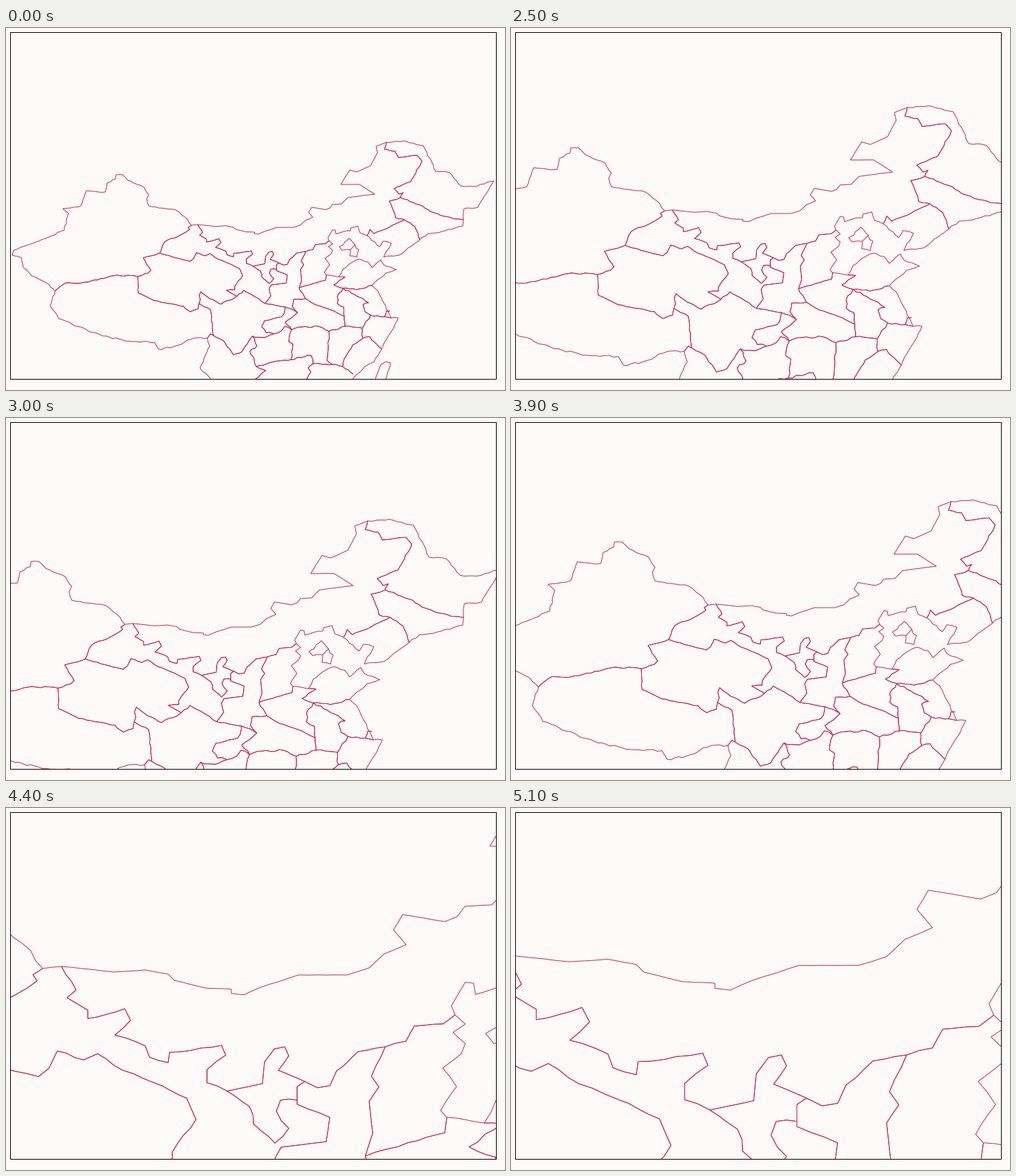
Write a matplotlib script that moves like this. It is 720 px wide and 523 px high and loops after 7.1 s.

```python
import numpy as np
import matplotlib.pyplot as plt
from matplotlib.animation import FuncAnimation
from matplotlib.collections import LineCollection
from matplotlib.patches import Rectangle

W, H, DPI = 720, 523, 100
PX = 72 / DPI
STEP = 100            # ms per frame
LOOP = 7100
PAPER, INK = "#fefafa", "#c72b54"
NOTCH = 1.2454        # zoom factor of one wheel step

rng = np.random.default_rng(8)
borders = []


def roughen(pts, rough):
    """Split long legs into short ones and push the new points sideways."""
    out = [pts[0]]
    for a, b in zip(pts, pts[1:]):
        leg = b - a
        n = max(1, round(np.hypot(*leg) / 5))
        side = np.array([-leg[1], leg[0]]) / np.hypot(*leg)
        for t in np.arange(1, n) / n:
            out.append(a + leg * t + side * rng.uniform(-rough, rough))
        out.append(b)
    return np.array(out)


def edge(*pts, rough=0.9):
    borders.append(roughen(np.array(pts, float), rough))


def shared(*pts, rough=0.9):
    """A border between two regions is stroked once for each of them."""
    edge(*pts, rough=rough)
    borders.append(borders[-1])


# Points where three borders meet, at scale 1
gate, steppe = (267.7, 285), (276.7, 284)
foot, pass_w, pass_n = (71, 380), (190, 359), (222, 325)
north, elbow, fork = (549, 165), (569, 245), (575, 277)
river, gulf, bay = (660, 277), (597, 306), (521, 300)
wall, bend, sand, dune = (466.3, 307.4), (432.6, 322.8), (393.9, 339.5), (356.5, 344.1)
well, knee, ridge, spur = (390.2, 348.5), (423, 375.5), (462.3, 356.8), (480.3, 359.5)
plain, cape, gorge, ford = (486, 376), (528, 372), (432, 391), (488, 416.5)
lake, moor, hill, delta = (489, 431), (466, 438), (514, 433.5), (526, 415)
port, dale, cove = (555.5, 419), (515, 448), (542, 464)
peak, glen, cliff = (333, 387.5), (278.5, 398), (374, 398)
brook, mill, cave = (403, 403), (420.5, 411), (412, 436)
snow, rim, wood, vale = (299, 444), (290.5, 448), (355.5, 445), (386, 442)
palm, fern, tea, rice, pine = (411, 479), (361, 489), (443, 485), (471, 486), (486, 489)

# Outer edges
edge(gate, (258, 273), (245, 263), (206, 257), (203, 247), (206, 241), (199, 230),
     (176, 220), (168, 212), (159, 212), (158, 218), (146, 224), (143, 237),
     (116, 235), (108, 257), (82, 261), (90, 268), (84, 292), (57, 304), (11, 321),
     (9, 328), (22, 332), (25, 346), (37, 358), (58, 368), foot)
edge(foot, (64, 402), (76, 420), (140, 445), (182, 453), (214, 454), (220, 464),
     (238, 462), (271, 448), rim, (294, 460), (280, 491), (295, 507), rough=1.3)
edge(gate, steppe, (302, 286.7), (317, 285.7), (328, 287.7), (331, 290.7),
     (346, 294.4), (358.5, 295), (358.5, 297), (364.5, 297.7), (372.5, 294.1),
     (391, 288.1), (414.2, 288.1), (424.9, 284.7), (432, 278), (442.6, 273.5),
     (436.6, 266.4), (441, 259), (461.3, 262.4), (467.3, 260), (471, 255),
     (484, 254.3), (493, 245), (532, 240), (510, 226), (483, 226), (496, 205),
     (506, 208), (526, 199), (536, 180), (534, 171), north, rough=0.1)
edge(north, (574, 163), (602, 170), (620, 207), (640, 209), (656, 228), (675, 229),
     (704, 221), (681, 259), (661, 261), river)
edge(river, (659, 286), (629, 294), (609, 297), gulf, (568, 328), (545, 331),
     (556, 311), (544, 308), (539, 316), bay)
edge(spur, (486, 348.5), (497, 340), (510, 334), (522, 338), (528, 346), (541, 335),
     (545, 342), (563, 349), (548, 354), cape, (536, 379), (545, 397), port,
     (566, 419), (560, 432), (551, 446), cove, (531, 482), (517, 490), (500, 507))
edge((533, 507), (541, 486), (548, 482), (555, 484), (548, 507), rough=0.4)

# Single lines round the capital
edge(wall, (464.5, 303), (468, 297), (471.2, 291.6), (475.2, 292.1), (476.1, 297.5),
     (491, 293), (496.8, 293), (497.8, 288.7), (507.7, 286.2), (511, 296), bay, rough=0.4)
edge((494.9, 304), (489, 308.9), (487, 312.9), (481, 316.3), (485, 321.2),
     (496.8, 320.3), (503.7, 313.4), (494.9, 304))
edge((503.7, 313.4), (505, 318), (509, 320.3), (506, 331), (496, 329), (496.8, 320.3))
edge(wall, (471.2, 311.8), (465.3, 315.8), (471.2, 321.2), (469.2, 326.2),
     (460.3, 333), (467, 342), (459.3, 353.5), ridge, spur, rough=0.5)

# North-east
shared(north, (546, 175), (561, 178), (566, 187), (593, 184), (600, 192), (584, 222),
       (560, 232), (567, 240), (573, 238), elbow)
shared(elbow, (553, 250), (559, 264), (562, 274), fork, (590, 287), gulf)
shared(elbow, (579, 248), (601, 257), (612, 265), (632, 272), river, rough=1.6)
shared(fork, (553, 288), (531, 297), (525, 291), bay)

# Desert border and the plateau below it
shared(steppe, (283.7, 295.4), (279.4, 299.1), (289.4, 305.1), (289.4, 309.1),
       (307.1, 304.4), (310, 310), (302.4, 317.1), (317.1, 322.4), (319.1, 327.8),
       (328.1, 330.4), (328.8, 325.4), (353.8, 322.1), (355.8, 326.8),
       (346.8, 333.8), (346.8, 340.1), dune, rough=0.5)
shared(dune, (373.5, 340.5), (374.5, 330.1), (379.2, 323.8), (384.2, 322.8),
       (386.2, 327.1), (381.2, 334.1), sand, rough=0.1)
shared(sand, (400, 342.5), (406, 341.5), (409.2, 334.4), (419.6, 325.1), bend,
       (442.6, 320.1), (446.6, 312.8), (460.6, 311.7), wall, rough=0.5)
shared(bend, (426, 337), (429.6, 342.1), (424.9, 349.1), (426.6, 364.5), knee, rough=0.2)
shared(ridge, (461.3, 364.2), (443.6, 369), knee, rough=0.6)
shared(dune, (367.2, 351.5), (369.2, 360), (379.5, 369.2), (386.2, 362.1),
       (380.2, 353.8), (382.2, 348.5), well)
shared(sand, (390.2, 342), well, (390.2, 350.5), (405.9, 356.8), (404.2, 368.5),
       (382.5, 371.2), (379.6, 376.4), (382, 387), cliff, rough=0.2)
shared(gate, (263, 288), (265, 291), (255, 297.4), (229, 309), pass_n)
shared(pass_n, (198, 332), (209, 350), (205, 354), pass_w)
shared(pass_n, (254, 334.5), (265.7, 337.1), (270.7, 333.1), (274.7, 324.8),
       (287.4, 329.1), (294.1, 326.1), (306, 334), (321, 340), (337, 347.5),
       (341.5, 357.8), (330.1, 373.5), (330, 378), (318, 379), peak, rough=0.5)
shared(peak, (310, 399), (294, 391), (281, 381), glen, rough=1.6)
shared(peak, (343, 379), (356, 386), cliff, brook, rough=1.3)
shared(foot, (87, 368), (103, 369), (132, 364), (160, 357), pass_w)
shared(pass_w, (191, 383), (214, 394), (256, 402), (266, 410), (277, 406), glen)
shared(glen, (295, 407), snow, (314, 452), (328, 472), (340, 468), wood)
shared(rim, (295, 442), snow)

# Central regions
shared(brook, (398, 417), (373, 423), (369, 432), (375, 440), vale, rough=1.6)
shared(brook, mill, (403, 425), cave, rough=1.6)
shared(wood, (368, 447), vale, (397, 438), (402, 431), cave, rough=1.6)
shared(knee, gorge, (415, 392), (413, 402), mill)
shared(gorge, (447, 400), (468, 407), ford, lake)
shared(spur, (489, 360), (473, 371), plain)
shared(plain, (506, 378), cape)
shared(plain, (478, 388), (478, 398), (487, 403), ford, rough=1.3)
shared(plain, (515, 391), (523, 397), (515, 400), (518, 410), delta, hill, rough=1.3)
shared(delta, (546, 417), port)
shared((546, 417), (549, 409), (554, 409))
shared(cave, (427, 432), (451, 431), moor, lake, hill, dale, rough=1.3)

# South
shared(dale, (525, 446), (534, 456), cove, rough=1.3)
shared(dale, (500, 458), (488, 478), pine, (501, 500))
shared(moor, (465, 460), (463, 480), rice, pine)
shared(cave, (408, 453), (414, 457), palm, (440, 473), tea, rice, rough=1.3)
shared(tea, (436, 491), (440, 497), (434, 507))
shared(palm, (383, 483), fern, (358, 478), (352, 467), (362, 459), wood, rough=1.3)
shared(fern, (375, 495), (360, 507))

# Each view: start in ms, wheel steps, x offset, y offset
VIEWS = [(0, 0, 0, 0), (1800, 8, -2237, -1472.5), (2500, 1, -111.8, -90.8),
         (3000, 1, -161.8, -56.8), (3600, 1, -134.8, -64.8), (3900, 1, -48.8, -84.8),
         (4400, 5, -749, -622), (4700, 8, -1865, -1490), (5100, 6, -1043.4, -847.6)]

fig = plt.figure(figsize=(W / DPI, H / DPI), dpi=DPI, facecolor=PAPER)
ax = fig.add_axes([0, 0, 1, 1])
ax.set(xlim=(0, W), ylim=(H, 0))
ax.axis("off")
lines = LineCollection([], colors=INK, linewidths=PX)
ax.add_collection(lines, autolim=False)
lines.set_clip_path(Rectangle((7, 7), 700, 500, transform=ax.transData))
ax.add_patch(Rectangle((6.5, 6.5), 701, 501, fill=False, ec="black", lw=PX, snap=False))


def draw(i):
    _, steps, tx, ty = [v for v in VIEWS if v[0] <= i * STEP][-1]
    lines.set_segments([NOTCH**steps * b + (tx, ty) for b in borders])
    return [lines]


anim = FuncAnimation(fig, draw, frames=LOOP // STEP, interval=STEP,
                     repeat=True, repeat_delay=0)
plt.show()
```
